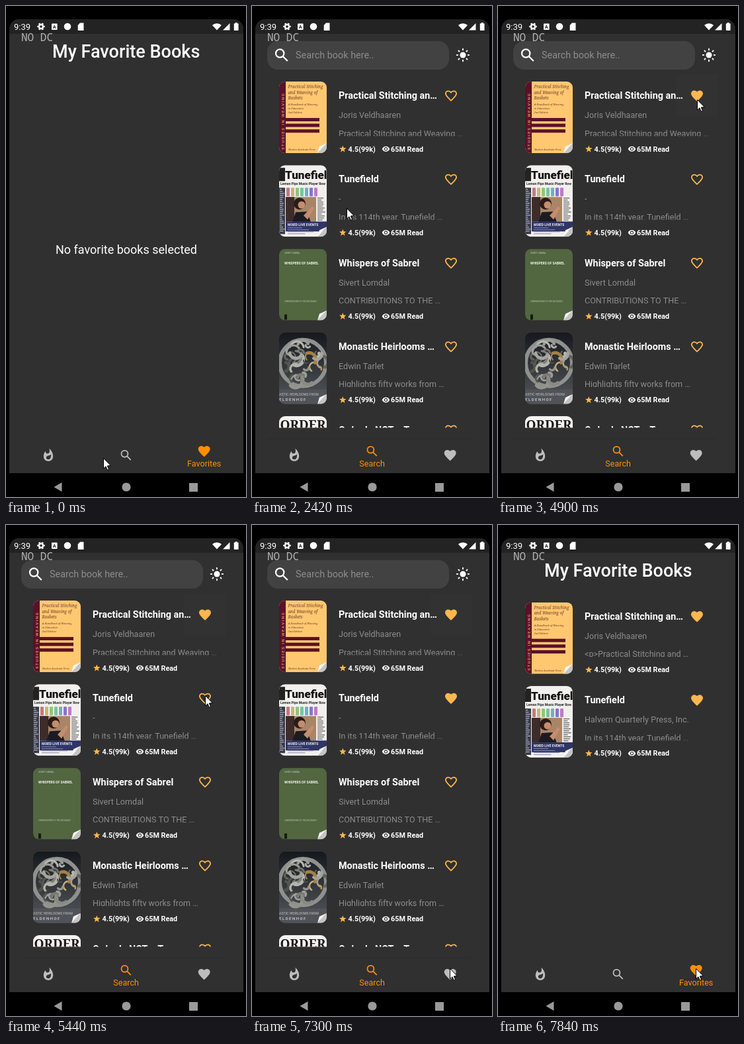
These frames come from a looping animation (363x741 px, 8 s). An HTML page with a canvas:

```html
<!DOCTYPE html>
<html lang="en">
<head>
<meta charset="utf-8">
<title>Book app</title>
<style>
html, body { margin: 0; width: 100%; height: 100%; overflow: hidden; background: #000; }
canvas { display: block; width: 363px; height: 741px; }
</style>
</head>
<body>
<canvas id="stage"></canvas>
<script>
const W = 363, H = 741, LOOP = 8000;
const canvas = document.getElementById('stage');
const g = canvas.getContext('2d');
const dpr = window.devicePixelRatio || 1;
canvas.width = W * dpr;
canvas.height = H * dpr;

const BG = '#303030', GREY = '#8c8c8c', ICON = '#bdbdbd', AMBER = '#ffb74d', ORANGE = '#ff8f00';
const SANS = 'Roboto, sans-serif', SERIF = '"Noto Serif", serif';
const TAU = 2 * Math.PI;

const clamp = v => Math.max(0, Math.min(1, v));
const ease = v => { v = clamp(v); return v * v * (3 - 2 * v); };
const mix = (a, b, k) => a + (b - a) * k;

function random(seed) {
  return () => (seed = seed * 16807 % 2147483647) / 2147483647;
}
function text(s, x, y, font, color, align = 'left') {
  g.font = font;
  g.fillStyle = color;
  g.textAlign = align;
  g.fillText(s, x, y);
}
function rect(x, y, w, h, color) {
  g.fillStyle = color;
  g.fillRect(x, y, w, h);
}
function disc(x, y, r, color) {
  g.fillStyle = color;
  g.beginPath();
  g.arc(x, y, r, 0, TAU);
  g.fill();
}
function arc(x, y, r, from, to, width, color) {
  g.strokeStyle = color;
  g.lineWidth = width;
  g.beginPath();
  g.arc(x, y, r, from, to);
  g.stroke();
}
function poly(points, color) {
  g.fillStyle = color;
  g.beginPath();
  points.forEach(([x, y]) => g.lineTo(x, y));
  g.closePath();
  g.fill();
}
function round(x, y, w, h, r, color) {
  g.beginPath();
  g.roundRect(x, y, w, h, r);
  if (color) { g.fillStyle = color; g.fill(); }
}
function rays(x, y, count, r0, r1, width, color, cap = 'butt') {
  g.strokeStyle = color;
  g.lineWidth = width;
  g.lineCap = cap;
  g.beginPath();
  for (let i = 0; i < count; i++) {
    const c = Math.cos(i * TAU / count), s = Math.sin(i * TAU / count);
    g.moveTo(x + r0 * c, y + r0 * s);
    g.lineTo(x + r1 * c, y + r1 * s);
  }
  g.stroke();
}

// Icons on a 24 unit grid
const heartPath = new Path2D('M12 20C6.5 15 3 12 3 8.5A4.5 4.5 0 0 1 7.5 4C9.3 4 11 5 12 6.6C13 5 14.7 4 16.5 4A4.5 4.5 0 0 1 21 8.5C21 12 17.5 15 12 20Z');
const firePath = new Path2D('M13.5.7C17.5 4 20 9 20 14A8 8 0 0 1 4 14C4 10.6 5.2 7.5 7.2 5.1C7 7.5 8.8 9.2 10.8 9.2C14.5 9.2 14.8 5 13.5.7ZM11.7 19C15 19 17 16 16.5 10.2C14 13.5 8.5 12 8.5 16A3.2 3 0 0 0 11.7 19Z');
const eyePath = new Path2D('M1 12C5 2 19 2 23 12C19 22 5 22 1 12Z');
const icons = {
  heartLine() { g.stroke(heartPath); },
  heart() { g.stroke(heartPath); g.fill(heartPath); },
  fire() { g.fill(firePath, 'evenodd'); },
  search(color) {
    arc(9.5, 9.5, 5.5, 0, TAU, 2, color);
    g.beginPath();
    g.moveTo(13.5, 13.5);
    g.lineTo(19.8, 19.8);
    g.stroke();
  },
  star(color) {
    const points = [];
    for (let i = 0; i < 10; i++) {
      const a = i * TAU / 10, r = i % 2 ? 4.4 : 10.5;
      points.push([12 + r * Math.sin(a), 12.5 - r * Math.cos(a)]);
    }
    poly(points, color);
  },
  eye(color) {
    g.fill(eyePath);
    arc(12, 12, 4, 0, TAU, 2, BG);
  }
};
function icon(name, x, y, size, color) {
  g.save();
  g.translate(x - size / 2, y - size / 2);
  g.scale(size / 24, size / 24);
  g.fillStyle = g.strokeStyle = color;
  g.lineWidth = 2;
  g.lineCap = 'butt';
  icons[name](color);
  g.restore();
}

// Covers, drawn in a 72 by 108 box
function curl() {
  poly([[72, 93], [72, 108], [58, 108]], '#c4c4c4');
  poly([[72, 93], [61, 98], [58, 108]], '#f6f6f6');
}
function lines(list, x, y, step, font, color) {
  list.forEach((s, i) => text(s, x, y + i * step, font, color));
}
const covers = [
  () => {
    const wine = '#5d1027', ink = '#6d3a24';
    rect(0, 0, 72, 108, '#fec871');
    rect(0, 0, 10, 108, wine);
    g.save();
    g.translate(7.5, 103);
    g.rotate(-TAU / 4);
    text('S T U D I E S   I N   W E A V I N G', 0, 0, '500 6px ' + SANS, '#d9a468');
    g.restore();
    lines(['Practical Stitching', 'and Weaving of', 'Baskets'], 13.5, 10, 8.6, 'italic 500 6.2px ' + SERIF, ink);
    lines(['A Handbook of Weaving', 'in Education', '2nd Edition'], 13.5, 36, 6, 'italic 4px ' + SERIF, ink);
    for (let i = 0; i < 3; i++) rect(10, 55 + i * 8.6, 51, 5, wine);
    text('Marlow Academic Press', 14, 104, '3.6px ' + SERIF, ink);
    curl();
  },
  () => {
    const rnd = random(11);
    rect(0, 0, 72, 108, '#f1f0ee');
    rect(0, 4, 9, 20, '#222');
    text('Tunefield', 9, 21, '900 17px ' + SANS, '#111');
    text('Lemon Pips Music Player Row', 2, 30, '700 5px ' + SANS, '#222');
    for (let i = 0; i < 7; i++) round(11 + i * 7, 34, 5, 13, 1, `hsl(${i * 50} 40% 62%)`);
    rect(10, 48, 46, 37, '#a98567');
    rect(10, 48, 13, 37, '#3d2c2a');
    disc(31, 58, 9, '#2a1b18');
    disc(34, 60, 5.5, '#c58d6d');
    poly([[20, 86], [25, 71], [42, 70], [48, 86]], '#1d1b22');
    poly([[37, 76], [50, 62], [53, 65], [43, 82]], '#c58d6d');
    rect(0, 34, 9, 70, '#3a3c4c');
    rect(10, 85, 62, 15, '#2f3566');
    for (let i = 0; i < 22; i++) {
      rect(1, 36 + i * 3, 3 + rnd() * 5, 1, '#c9cbd6');
      if (i < 12) rect(58, 49 + i * 3, 6 + rnd() * 7, 1.3, '#666');
    }
    text('MIXED LIVE EVENTS', 13, 92, '700 5px ' + SANS, '#eee');
    for (let i = 0; i < 4; i++) rect(13, 94 + i * 3, 20 + rnd() * 20, 1, '#8a8cab');
    curl();
  },
  () => {
    const pale = '#c5cebc';
    rect(0, 0, 72, 108, '#526640');
    text('SIVERT LOMDAL', 8, 7, '3.2px ' + SANS, pale);
    text('WHISPERS OF SABREL', 8, 23, '700 5px ' + SANS, '#f3f5ef');
    text('CONTRIBUTIONS TO THE SOCIOLOGY', 8, 80, '2.9px ' + SANS, pale);
    rect(8, 99, 4, 8, '#151a10');
    curl();
  },
  () => {
    const rnd = random(7);
    const sky = g.createLinearGradient(0, 0, 0, 108);
    sky.addColorStop(0, '#15181d');
    sky.addColorStop(1, '#55585c');
    rect(0, 0, 72, 108, sky);
    arc(36, 46, 35, 0, TAU, 6, '#8f918f');
    // Carved limbs and leaves
    g.lineCap = 'round';
    for (let i = 0; i < 34; i++) {
      const a = rnd() * TAU, r = 30 * Math.sqrt(rnd()), from = rnd() * TAU;
      const gold = Math.cos(a) > .3 && rnd() > .5;
      const tone = gold ? `hsl(38 40% ${45 + rnd() * 20}%)` : `hsl(60 3% ${25 + rnd() * 50}%)`;
      arc(36 + r * Math.cos(a), 46 + r * Math.sin(a), 3 + rnd() * 8, from, from + 2.5, 2 + rnd() * 3, tone);
    }
    rect(0, 86, 72, 22, '#505358');
    text('ASTIC HEIRLOOMS FROM', 0, 95, '5.2px ' + SANS, '#c3c5c8');
    text('E L D E N H O F', 0, 103, '500 6px ' + SANS, '#d3d5d8');
    curl();
  },
  () => {
    rect(0, 0, 72, 108, '#f4f3f1');
    text('ORDER', 36, 20, '700 19px ' + SERIF, '#1b1515', 'center');
  }
];

const books = [
  ['Practical Stitching an…', 'Joris Veldhaaren', 'Practical Stitching and Weaving …'],
  ['Tunefield', '-', 'In its 114th year, Tunefield …'],
  ['Whispers of Sabrel', 'Sivert Lomdal', 'CONTRIBUTIONS TO THE …'],
  ['Monastic Heirlooms …', 'Edwin Tarlet', 'Highlights fifty works from …'],
  ['Order Is NOT a Ta…', '', '']
];
const favorites = [
  [books[0][0], books[0][1], '<p>Practical Stitching and …'],
  [books[1][0], 'Halvern Quarterly Press, Inc.', books[1][2]]
];

function bookRow([title, author, desc], i, top, liked) {
  const y = top + i * 126.25;
  g.save();
  round(41, y, 72, 108, 9);
  g.clip();
  g.translate(41, y);
  covers[i]();
  g.restore();
  text(title, 131, y + 26.2, '700 14.4px ' + SANS, '#fff');
  text(author, 131, y + 55, '12.6px ' + SANS, GREY);
  g.save();
  g.beginPath();
  g.rect(125, y + 65, 220, 17.2);
  g.clip();
  text(desc, 131, y + 82.6, '12.6px ' + SANS, GREY);
  g.restore();
  icon('star', 137.3, y + 101.7, 12.6, AMBER);
  text('4.5(99k)', 145.6, y + 105.5, '700 10.8px ' + SANS, '#fff');
  icon('eye', 202.5, y + 101.7, 12.6, '#fff');
  text('65M Read', 210, y + 105.5, '700 10.8px ' + SANS, '#fff');
  icon(liked ? 'heart' : 'heartLine', 301, y + 21.5, 21.6, AMBER);
}

function searchPage(t) {
  round(23, 53, 275, 43, 16, '#424242');
  icon('search', 45, 74.3, 27, '#fff');
  text('Search book here..', 66, 78.5, '14.4px ' + SANS, GREY);
  disc(319, 74, 4.5, '#fff');
  rays(319, 74, 8, 7.8, 9.2, 1.9, '#fff', 'round');
  rect(23, 653, 306, 1, '#2c2c2c');
  if (t > 4350) rect(270, 104, 63, 63, '#323232');
  g.save();
  g.beginPath();
  g.rect(5, 96, 354, 540.5);
  g.clip();
  const liked = [t >= 4530, t >= 6110];
  books.forEach((b, i) => bookRow(b, i, 114, liked[i]));
  g.restore();
}

function favoritesPage(filled) {
  text('My Favorite Books', 181.7, 77.5, '500 27px ' + SANS, '#fff', 'center');
  if (filled) favorites.forEach((b, i) => bookRow(b, i, 116.7, true));
  else text('No favorite books selected', 182, 374, '18px ' + SANS, '#fff', 'center');
}

// Touch ripple: the splash grows slowly while held and quickly after release
function ripple(t, cx, cy, x0, y0, down, up) {
  if (t < down || t > up + 240) return;
  const held = clamp((Math.min(t, up) - down) / 1000);
  const grow = t < up ? held : mix(held, 1, clamp((t - up) / 225));
  const fade = 1 - clamp((t - up) / 220);
  const ink = a => `rgba(204,204,204,${a * fade})`;
  disc(cx, cy, 31.5, ink(.25 * clamp((t - down) / 180)));
  disc(mix(x0, cx, grow), mix(y0, cy, grow), 31.5 * grow, ink(.25));
}

const TO_SEARCH = 1890, TO_FAVORITES = 7620;

function tab(name, label, x, on) {
  icon(name, x, 678 - 6 * on, 21.6, on > .5 ? ORANGE : ICON);
  g.save();
  g.globalAlpha = on;
  text(label, x, 694.7, '12.6px ' + SANS, ORANGE, 'center');
  g.restore();
}

function bottomBar(t) {
  g.save();
  g.beginPath();
  g.rect(5, 654, 354, 51);
  g.clip();
  ripple(t, 182, 679, 166, 682, 1390, TO_SEARCH);
  ripple(t, 300, 679, 299, 669, 7520, TO_FAVORITES);
  const search = ease((t - TO_SEARCH) / 200) - ease((t - TO_FAVORITES) / 200);
  tab('fire', '', 64, 0);
  tab('search', 'Search', 181.7, search);
  tab('heart', 'Favorites', 299.7, 1 - search);
  g.restore();
}

function statusBar() {
  rect(5, 20, 354, 22, '#232323');
  text('9:39', 12, 35.7, '13px ' + SANS, '#fff');
  arc(53, 31, 3.1, 0, TAU, 2.5, '#fff');
  rays(53, 31, 6, 3.5, 5.7, 2.7, '#fff');
  round(69, 26.5, 8.6, 9.6, 1, '#fff');
  text('A', 73.3, 34.2, '700 7.5px ' + SANS, '#232323', 'center');
  disc(93, 31, 5.3, '#fff');
  poly([[112, 25.5], [117.5, 25.5], [117.5, 37], [108.7, 37], [108.7, 29]], '#fff');
  g.beginPath();
  g.moveTo(319, 36.5);
  g.arc(319, 36.5, 10.3, -TAU * .37, -TAU * .13);
  g.fill();
  poly([[328, 36.5], [338.5, 36.5], [338.5, 26]], '#fff');
  round(344.8, 26.3, 6.8, 10.7, 1, '#fff');
  rect(346.8, 25, 2.8, 2, '#fff');
}

function systemBar() {
  poly([[72.5, 726], [84.5, 719], [84.5, 733]], '#999');
  disc(182, 726, 6.6, '#999');
  rect(277, 720, 13, 13, '#999');
}

// Pointer moves: start, end, x, y, sideways bow
const moves = [
  [30, 240, 141, 682], [440, 600, 165, 682], [1980, 2190, 207, 501],
  [2190, 2400, 143, 305], [2450, 2840, 101, 67], [3150, 3740, 298, 136],
  [4840, 4900, 301, 141], [4960, 5440, 301, 257, 5], [6230, 6290, 301, 261],
  [6540, 7300, 299, 669, -32]
];
function pointer(t) {
  let x = 147, y = 682;
  for (const [from, to, x1, y1, bow = 0] of moves) {
    const k = clamp((t - from) / (to - from));
    x = mix(x, x1, k) + bow * Math.sin(Math.PI * k);
    y = mix(y, y1, k);
  }
  g.save();
  g.translate(x, y);
  poly([[.5, .5], [.5, 16], [4, 12.8], [6.3, 18.2], [8.6, 17.2], [6.3, 12], [11.3, 11.6]], '#fff');
  g.strokeStyle = '#000';
  g.lineWidth = 1;
  g.lineJoin = 'round';
  g.stroke();
  g.restore();
}

function draw(t) {
  g.setTransform(dpr, 0, 0, dpr, 0, 0);
  rect(0, 0, W, H, '#000');
  g.save();
  round(5, 20, 354, 685, [15, 15, 0, 0], BG);
  g.clip();
  statusBar();
  if (t >= TO_SEARCH && t < TO_FAVORITES) searchPage(t);
  else favoritesPage(t >= TO_FAVORITES);
  ripple(t, 301.5, 135.5, 298, 136, 4080, 4170);
  ripple(t, 301.5, 261.5, 301, 257, 5600, 5640);
  bottomBar(t);
  text('NO DC', 23, 53.3, '100 16px "Noto Sans Mono", monospace', '#b4b4b4');
  g.restore();
  systemBar();
  pointer(t);
}

const start = performance.now();
function frame() {
  draw((performance.now() - start) % LOOP);
  requestAnimationFrame(frame);
}
frame();
</script>
</body>
</html>
```
